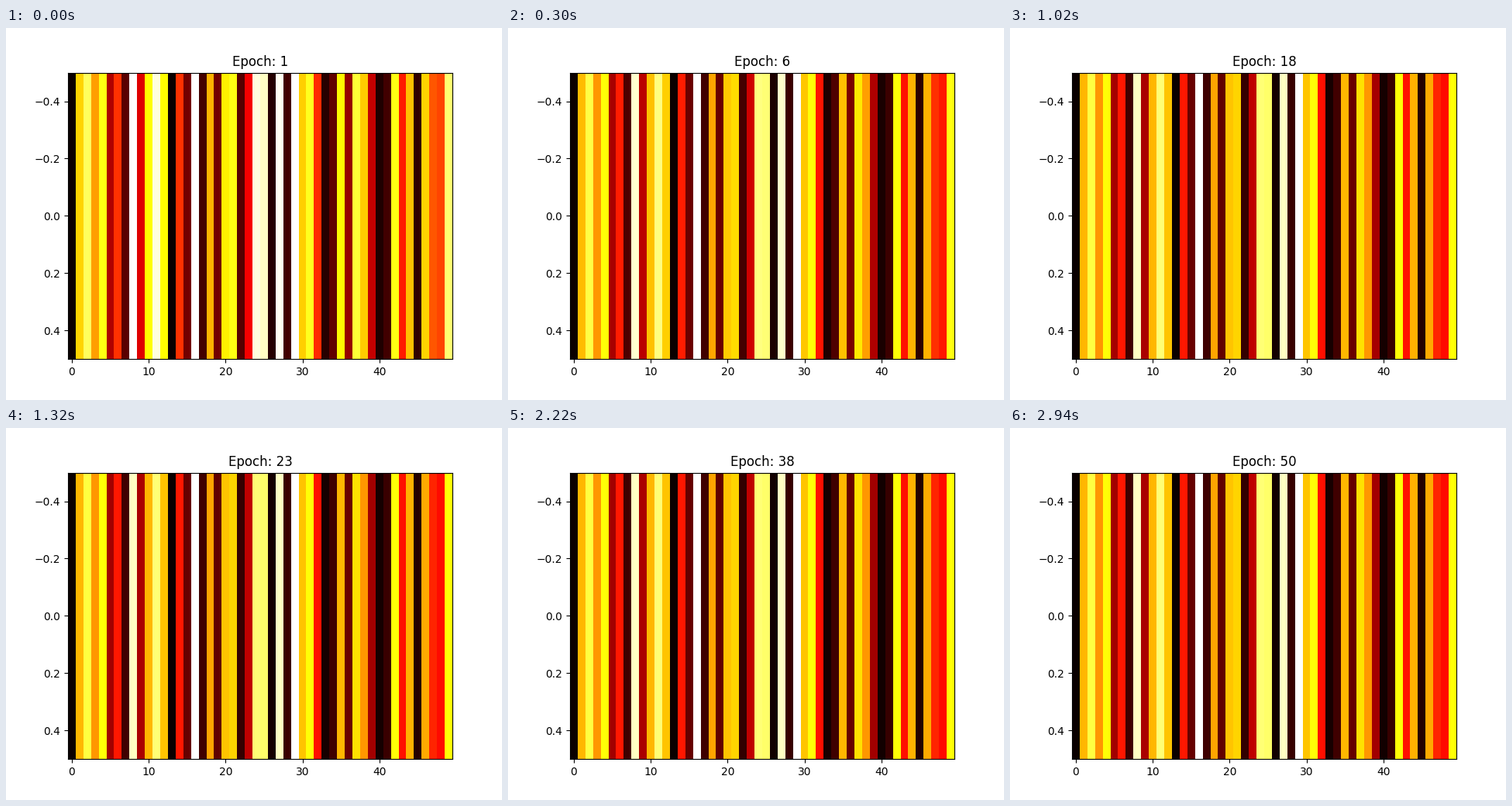
Animation, 640 px wide and 480 px high, one loop 3000 ms. Source, as a matplotlib script:

```python
import numpy as np
import matplotlib.pyplot as plt
from matplotlib.animation import FuncAnimation

EPOCHS = 50
INTERVAL = 60  # ms

# Level each cell settles at, in percent of the colour range
SETTLED = np.array([
    0, 64, 81, 59, 75, 23, 40, 8, 94, 24, 64, 86, 66, 0, 40, 14, 100,
    8, 61, 13, 66, 68, 6, 27, 86, 85, 1.5, 94, 7, 100, 66, 75, 39, 2,
    8, 64, 14, 70, 59, 23, 1.5, 7, 75, 39, 63, 4, 62, 42, 38, 75]) / 100

CELL = np.arange(len(SETTLED))

# Cells start too bright, in a ripple that fades out towards black
RIPPLE = np.cos(2 * np.pi * (CELL - 10) / 13)
LIFT = (.065 + .05 * RIPPLE) * SETTLED ** .25

# Dark cells take longer to settle
TAU = 2.5 + 6 * (1 - SETTLED) ** 4


def levels(epoch):
    values = SETTLED + LIFT * np.exp((1 - epoch) / TAU)
    return np.clip(values, 0, 1)[None, :]


fig, ax = plt.subplots(figsize=(6.4, 4.8), dpi=100)
image = ax.imshow(levels(1), cmap="hot", vmin=0, vmax=1,
                  aspect="auto", interpolation="nearest")
title = ax.set_title("Epoch: 1")


def update(frame):
    epoch = frame + 1
    image.set_data(levels(epoch))
    title.set_text(f"Epoch: {epoch}")
    return image, title


anim = FuncAnimation(fig, update, frames=EPOCHS, interval=INTERVAL,
                     repeat=True, repeat_delay=0)
plt.show()
```
